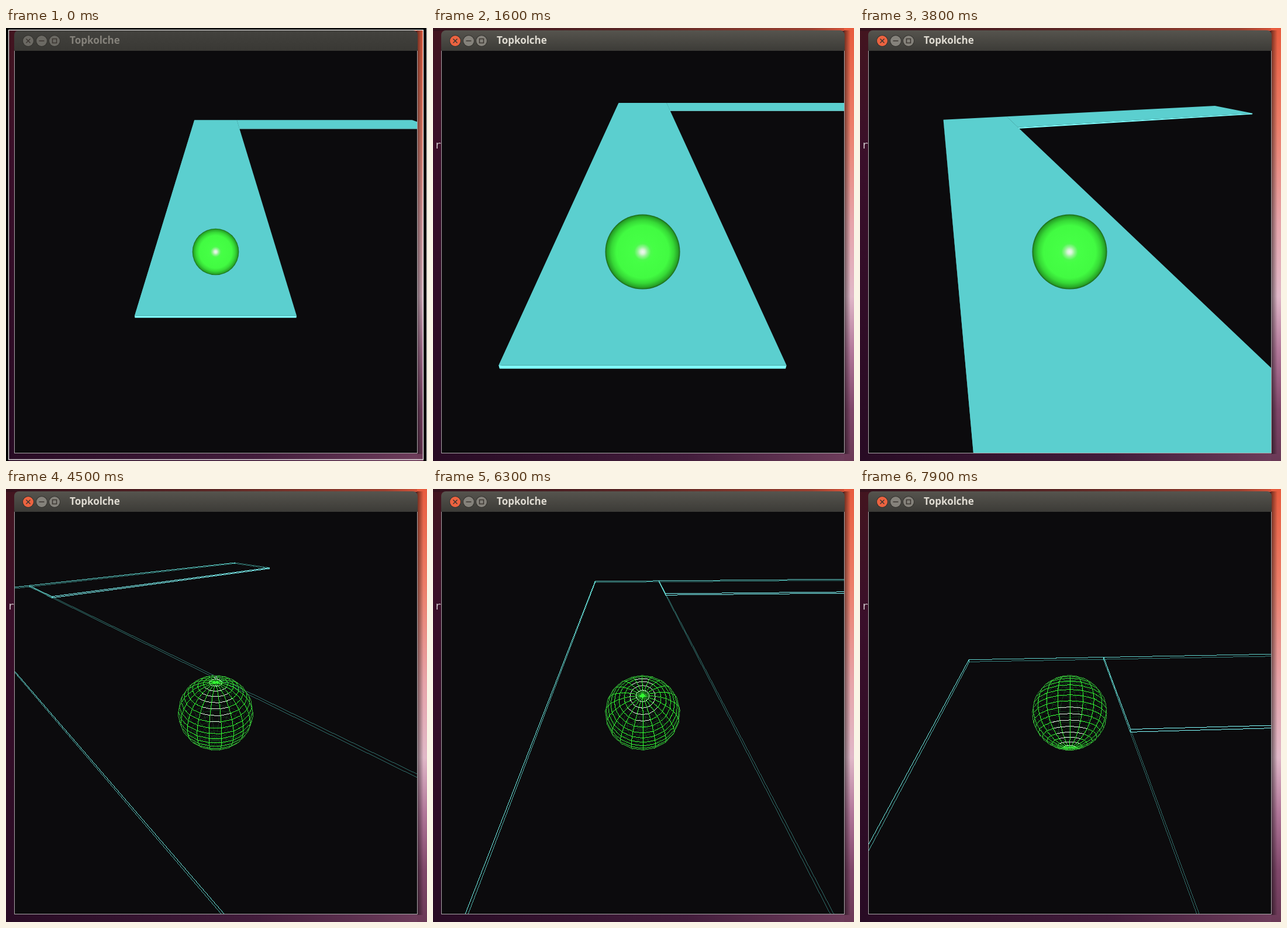
Recreate the animation shown at these times as an HTML page with a canvas. Size 720 by 740 pixels, loop 8 s.

```html
<!DOCTYPE html>
<html lang="en">
<head>
<meta charset="utf-8">
<title>Topkolche</title>
<style>
  html, body { margin: 0; width: 100%; height: 100%; overflow: hidden; background: #000; }
  canvas { display: block; }
</style>
</head>
<body>
<canvas id="stage" width="720" height="740"></canvas>
<script>
const ctx = document.getElementById('stage').getContext('2d');
const LOOP = 8000, RAD = Math.PI / 180;
const CX = 358.5, CY = 382.5, FOCAL = 595.8;
const SIN = 0.5, COS = Math.sqrt(3) / 2;   // camera looks down by 30 degrees
const NEAR = 0.3, SLAB = 0.1;
const WIRE_START = 4100;

// Piecewise linear curves: [input, value]
const ZOOM = [[300, 15], [1050, 9.36]];
const TRAVEL = [[1700, 0], [2800, 9.2], [2900, 9.8], [6050, 9.8], [6650, 16],
                [6900, 23], [7200, 24.5], [7650, 32.35]];
const YAW = [[3300, 0], [4400, 40.1], [4500, 40.1], [4750, 28.5], [5600, 17.1], [6000, 2.87]];
const ROLL = [[0, -510], [9.8, 50], [23, 840], [32.35, 1376]];   // degrees by distance

// Track pieces: x from, x to, forward from, forward to
const TRACK = [[-3, 3, -3, 39], [3, 27.8, 33, 39]];

function curve(keys, x) {
  if (x <= keys[0][0]) return keys[0][1];
  for (let i = 1; i < keys.length; i++) {
    const [x0, y0] = keys[i - 1], [x1, y1] = keys[i];
    if (x < x1) return y0 + (y1 - y0) * (x - x0) / (x1 - x0);
  }
  return keys[keys.length - 1][1];
}

// Steps of 100 ms, every fifth one held; the opening picture stays for 300 ms
function stepTime(ms) {
  let step = Math.floor(ms / 100);
  if (step < 3) return 0;
  if (step % 5 === 2) step--;
  return step * 100;
}

function poseAt(t) {
  const distance = curve(TRAVEL, t);
  const hop = 2.7 * (1 - ((t - 2650) / 550) ** 2);
  return {
    dist: curve(ZOOM, t),
    yaw: curve(YAW, t) * RAD,
    roll: curve(ROLL, distance) * RAD,
    x: Math.max(0, distance - 9.8) * 0.0501,
    y: 1 + Math.max(0, hop),
    z: distance
  };
}

function gradient(x0, y0, x1, y1, stops) {
  const g = ctx.createLinearGradient(x0, y0, x1, y1);
  stops.forEach(([at, color]) => g.addColorStop(at, color));
  return g;
}

function rect(x, y, w, h, fill) {
  ctx.fillStyle = fill;
  ctx.fillRect(x, y, w, h);
}

function disc(x, y, r, fill) {
  ctx.fillStyle = fill;
  ctx.beginPath();
  ctx.arc(x, y, r, 0, 7);
  ctx.fill();
}

function line(x0, y0, x1, y1) {
  ctx.beginPath();
  ctx.moveTo(x0, y0);
  ctx.lineTo(x1, y1);
  ctx.stroke();
}

// One pixel wide line without smoothing
function pixelLine([x0, y0], [x1, y1], color) {
  ctx.fillStyle = color;
  const steps = Math.max(1, Math.ceil(Math.max(Math.abs(x1 - x0), Math.abs(y1 - y0))));
  for (let i = 0; i <= steps; i++) {
    const k = i / steps;
    ctx.fillRect(Math.floor(x0 + (x1 - x0) * k), Math.floor(y0 + (y1 - y0) * k), 1, 1);
  }
}

function drawDesktop(active) {
  rect(0, 0, 720, 740, gradient(0, 0, 0, 740, [[0, '#43151f'], [0.3, '#3a0f2a'], [1, '#280b24']]));
  rect(0, 0, 720, 5, gradient(0, 0, 720, 0, [[0, '#35121d'], [0.5, '#5c2826'], [0.9, '#9a4030'], [1, '#e2583c']]));
  rect(0, 727, 720, 13, gradient(0, 0, 720, 0, [[0, '#280b24'], [0.6, '#431d3c'], [1, '#6f3e5c']]));
  rect(703, 0, 17, 740, gradient(0, 0, 0, 740,
    [[0, '#e85c3e'], [0.22, '#ec7d68'], [0.45, '#e6a4aa'], [0.62, '#e0b8c8'],
     [0.75, '#b07698'], [0.88, '#80476a'], [1, '#6a3956']]));
  rect(703, 4, 11, 724, gradient(703, 0, 714, 0, [[0, '#0008'], [1, '#0000']]));
  if (active) {
    ctx.fillStyle = '#d0c8cc';
    ctx.font = '18px "DejaVu Sans Mono", monospace';
    ctx.fillText('r', 3, 206);
  } else {
    rect(0, 0, 4, 740, '#000');
    rect(0, 0, 720, 3, '#000');
    rect(714, 0, 6, 740, '#000');
    rect(719, 0, 1, 740, '#ddd');
    ctx.strokeStyle = '#eee';
    ctx.lineWidth = 1.3;
    ctx.strokeRect(4.5, 3.5, 709, 734);
  }
}

function drawWindow(active) {
  rect(14, 39, 690, 688, '#aaa5a8');
  rect(15, 39, 688, 687, '#0c0b0d');
  ctx.fillStyle = gradient(0, 4, 0, 39, active ? [[0, '#56544e'], [1, '#3c3b37']]
                                               : [[0, '#43423e'], [1, '#393834']]);
  ctx.beginPath();
  ctx.roundRect(14, 4, 690, 35, [8, 8, 0, 0]);
  ctx.fill();

  [38, 61, 83].forEach((x, i) => {
    disc(x, 22, 10, '#33322e');
    disc(x, 22, 9, !active ? '#6b6963' : i ? '#85827b' : '#ec6340');
    ctx.strokeStyle = '#3b3530';
    ctx.lineWidth = 1.5;
    if (i === 0) {
      line(x - 3.5, 18.5, x + 3.5, 25.5);
      line(x - 3.5, 25.5, x + 3.5, 18.5);
    } else if (i === 1) {
      line(x - 4.5, 22, x + 4.5, 22);
    } else {
      ctx.strokeRect(x - 3.5, 18.5, 7, 7);
    }
  });

  ctx.fillStyle = active ? '#dfdbd2' : '#85827b';
  ctx.font = 'bold 17px "Open Sans", sans-serif';
  ctx.fillText('Topkolche', 109, 27);
}

function toCamera(pose, [x, y, z]) {
  const a = x - pose.x, up = y - pose.y, b = z - pose.z;
  const c = Math.cos(pose.yaw), s = Math.sin(pose.yaw);
  const ahead = a * s + b * c;
  return [a * c - b * s, up * COS + ahead * SIN, pose.dist + ahead * COS - up * SIN];
}

// Screen points of a shape, cut off at the near plane
function project(pose, points) {
  const cam = points.map(p => toCamera(pose, p));
  const kept = [];
  cam.forEach((p, i) => {
    const q = cam[(i + 1) % cam.length];
    if (p[2] > NEAR) kept.push(p);
    if ((p[2] > NEAR) !== (q[2] > NEAR)) {
      const k = (NEAR - p[2]) / (q[2] - p[2]);
      kept.push(p.map((v, j) => v + (q[j] - v) * k));
    }
  });
  return kept.map(([x, y, z]) => [CX + FOCAL * x / z, CY - FOCAL * y / z]);
}

function drawSolidTrack(pose) {
  const face = (color, points) => {
    ctx.beginPath();
    project(pose, points).forEach(([x, y]) => ctx.lineTo(x, y));
    ctx.fillStyle = color;
    ctx.fill();
  };
  for (const [l, r, n, f] of TRACK) {
    face('#48aaa8', [[l, 0, n], [l, 0, f], [l, -SLAB, f], [l, -SLAB, n]]);
    face('#80ffff', [[l, 0, n], [r, 0, n], [r, -SLAB, n], [l, -SLAB, n]]);
  }
  for (const [l, r, n, f] of TRACK) {
    face('#5bcfcf', [[l, 0, n], [r, 0, n], [r, 0, f], [l, 0, f]]);
  }
}

function drawWireTrack(pose) {
  const edge = (color, from, to) => {
    const [p, q] = project(pose, [from, to]);
    if (p) pixelLine(p, q, color);
  };
  for (const [l, r, n, f] of TRACK) {
    for (const y of [-SLAB, 0]) {
      edge(y ? '#35807c' : '#5fd0ca', [l, y, f], [r, y, f]);
      edge('#2f6c68', [r, y, n], [r, y, f]);
      edge(y ? '#4fb0aa' : '#70f0e8', [l, y, n], [l, y, f]);
      edge('#80ffff', [l, y, n], [r, y, n]);
    }
    for (const x of [l, r]) {
      for (const z of [n, f]) edge('#5fd0ca', [x, 0, z], [x, -SLAB, z]);
    }
  }
}

function drawSolidBall(pose) {
  const r = FOCAL / Math.sqrt(pose.dist ** 2 - 1);
  const shade = ctx.createRadialGradient(CX, CY, 0, CX, CY, r);
  [[0, '#f0f8f0'], [0.06, '#d8f4d8'], [0.13, '#92f492'], [0.22, '#4dfb4d'], [0.3, '#45ff45'],
   [0.7, '#42fb42'], [0.84, '#36d936'], [0.95, '#27a527'], [1, '#1b671b']]
    .forEach(([at, color]) => shade.addColorStop(at, color));
  disc(CX, CY, r, shade);
}

function drawWireBall(pose) {
  const sr = Math.sin(pose.roll), cr = Math.cos(pose.roll);
  const spin = pose.yaw * 1.19 - 20.3 * RAD;
  const poleSide = Math.sign(sr * cr);   // +1 when the visible pole is above the centre
  const glowY = CY - 20 * poleSide;

  const point = (stack, slice) => {
    const phi = stack * 9 * RAD, lambda = slice * 18 * RAD + spin;
    const along = Math.cos(phi), side = Math.sin(phi);
    const q = side * Math.cos(lambda);
    const toward = along * cr - q * sr;
    const scale = FOCAL / (pose.dist - toward);
    return [CX + scale * side * Math.sin(lambda), CY - scale * (along * sr + q * cr), toward];
  };

  const front = [], back = [];
  const add = (p, q, parallel) => {
    const toward = (p[2] + q[2]) / 2;
    (toward > 1 / pose.dist ? front : back).push({ p, q, toward, parallel });
  };
  for (let i = 0; i < 20; i++) {
    for (let j = 0; j < 20; j++) {
      const p = point(i, j);
      if (i) add(p, point(i, j + 1), true);
      add(p, point(i + 1, j), false);
    }
  }

  back.forEach(({ p, q }) => pixelLine(p, q, '#12381a'));
  front.forEach(({ p, q, toward, parallel }) => {
    const mx = (p[0] + q[0]) / 2 - CX, my = (p[1] + q[1]) / 2 - glowY;
    const lit = parallel && (mx / 25) ** 2 + (my / 42) ** 2 < 1;
    pixelLine(p, q, lit ? '#e8f8e8' : `rgb(50,${Math.min(250, 125 + 200 * toward)},50)`);
  });
}

function draw(t) {
  const active = t >= 300, wire = t >= WIRE_START;
  const pose = poseAt(t);
  drawDesktop(active);
  drawWindow(active);
  ctx.save();
  ctx.beginPath();
  ctx.rect(15, 39, 688, 687);
  ctx.clip();
  if (wire) {
    drawWireTrack(pose);
    drawWireBall(pose);
  } else {
    drawSolidTrack(pose);
    drawSolidBall(pose);
  }
  ctx.restore();
}

let start, shown;
function tick(now) {
  start ??= now;
  const t = stepTime((now - start) % LOOP);
  if (t !== shown) draw(shown = t);
  requestAnimationFrame(tick);
}
requestAnimationFrame(tick);
</script>
</body>
</html>
```
